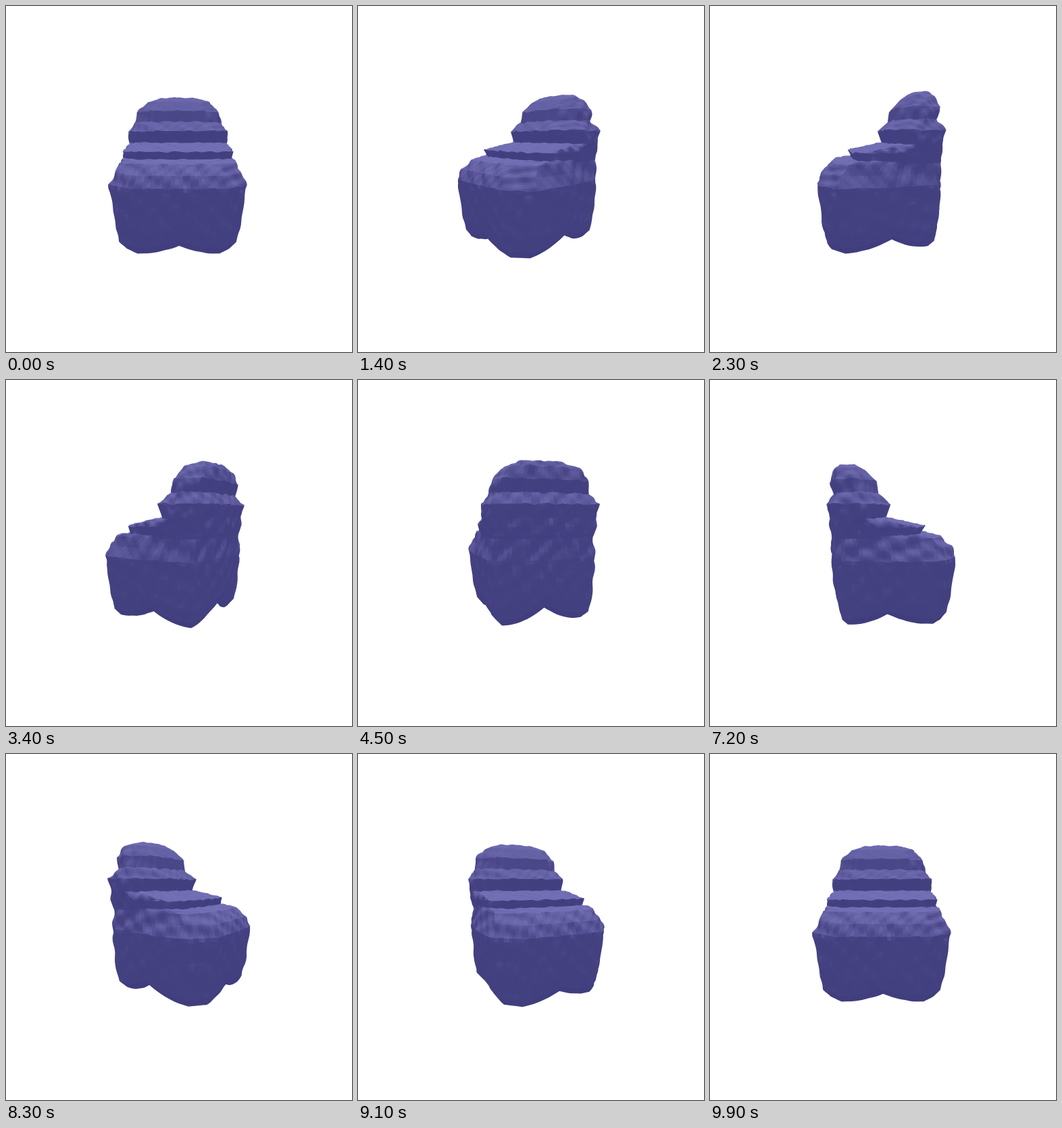
Write an HTML page with a canvas that moves like this. It is 512 by 512 pixels and loops after 10 s.

```html
<!DOCTYPE html>
<html>
<head>
<meta charset="utf-8">
<style>
html, body { margin: 0; width: 100%; height: 100%; overflow: hidden; background: #fff }
canvas { display: block; width: 512px; height: 512px }
</style>
</head>
<body>
<canvas id="stage" width="1024" height="1024"></canvas>
<script>
const ctx = document.getElementById('stage').getContext('2d');
ctx.scale(2, 2);
ctx.lineWidth = 0.8;
ctx.lineJoin = 'round';

// Horizontal outlines, bottom to top:
// height, front z, front corner x, shoulder x z, side x z, back corner x z
const RINGS = [
  [-94, 75, 51, 67, 56, 66, -4, 54, -54],
  [-84, 81, 54, 75, 59, 73, -4, 62, -61],
  [-66, 85, 55, 79, 60, 76, -2, 65, -64],
  [-36, 88, 56, 82, 62, 79, 0, 66, -66],
  [-8, 91, 57, 86, 62, 82, 0, 68, -67],
  [6, 85, 53, 79, 58, 77, -5, 66, -66],
  [19, 72, 50, 75, 50, 74, -10, 64, -66],
  [23, 45, 49, 72, 29, 73, -15, 65, -67],
  [33, 49, 50, 74, 31, 76, -18, 67, -68],
  [44, -1, 44, 70, -22, 76, -35, 67, -68],
  [61, 5, 45, 71, -22, 77, -40, 68, -71],
  [75, -10, 38, 62, -31, 67, -44, 58, -62],
  [91, -12, 35, 59, -32, 64, -46, 55, -67],
  [106, -26, 28, 46, -38, 49, -48, 44, -63],
  [113, -36, 18, 28, -42, 30, -48, 28, -58],
  [114, -46, 1, 2, -48, 2, -49, 1, -50]
];
const LIFT = [11, 0, 0, 16, 0, 22, 0, 16, 0, 0];  // arches between the feet
const AROUND = 12, UP = 6, SIDES = 10 * AROUND;
const DIST = 430, TILT = Math.asin(0.12), SIN = Math.sin(TILT), COS = Math.cos(TILT);
const clamp = v => Math.max(0, Math.min(1, v));
const mix = (a, b, u) => a + (b - a) * u;

function outline([, z0, x1, x2, z2, xs, zs, xb, zb]) {
  const half = [[x1, z0 - 2], [x2, z2], [xs, zs], [xb, zb]];
  const other = half.map(([x, z]) => [-x * 1.03, z]).reverse();
  return [[0, z0], ...half, [0, zb - 8], ...other];
}

function roughen(x, y, z) {
  const amount = y < -14 ? 0.6 : 1;
  const n = amount * (
    1.5 * Math.sin(0.27 * x + 0.8 * Math.sin(0.11 * y)) * Math.sin(0.25 * z + 0.13 * y + 1) +
    0.9 * Math.sin(0.21 * y + 0.17 * x - 0.1 * z) +
    0.6 * Math.sin(0.41 * x - 0.2 * y + 0.37 * z));
  const r = Math.hypot(x, z + 10) + 8;
  return [x + n * x / r, y + 0.5 * n, z + n * (z + 10) / r];
}

function buildRow(ring) {
  const pts = outline(ring), row = [];
  const arch = clamp((-ring[0] - 48) / 46);
  for (let i = 0; i < SIDES; i++) {
    const k = Math.floor(i / AROUND), next = (k + 1) % 10, u = i % AROUND / AROUND;
    const lift = LIFT[k] * (1 - u) ** 2 + LIFT[next] * u * u;
    row.push(roughen(mix(pts[k][0], pts[next][0], u), ring[0] + lift * arch,
      mix(pts[k][1], pts[next][1], u)));
  }
  return row;
}

const rows = [];
for (let j = 0; j <= (RINGS.length - 1) * UP; j++) {
  const k = Math.min(Math.floor(j / UP), RINGS.length - 2), u = j / UP - k;
  rows.push(buildRow(RINGS[k].map((v, i) => mix(v, RINGS[k + 1][i], u))));
}
const verts = rows.flat();

// The light comes from straight above, so each facet keeps its colour while turning
function shade(a, b, c, d) {
  const p = c.map((v, i) => v - a[i]), q = d.map((v, i) => v - b[i]);
  const nx = p[1] * q[2] - p[2] * q[1];
  const ny = p[2] * q[0] - p[0] * q[2];
  const nz = p[0] * q[1] - p[1] * q[0];
  const up = ny / (Math.hypot(nx, ny, nz) || 1);
  const t = up > 0 ? up : up * 0.12;
  return `rgb(${[[69, 48], [66, 47], [130, 52]].map(([v, s]) => Math.round(v + s * t))})`;
}

const facets = [];
for (let j = 0; j < rows.length - 1; j++) {
  for (let i = 0; i < SIDES; i++) {
    const n = (i + 1) % SIDES, low = j * SIDES, high = low + SIDES;
    const ids = [low + i, low + n, high + n, high + i];
    facets.push({ ids, color: shade(...ids.map(id => verts[id])) });
  }
}

function project([x, y, z], cos, sin) {
  const px = x * cos - z * sin, pz = x * sin + z * cos;
  const depth = pz * COS + y * SIN, k = DIST / (DIST - depth);
  return [256 + px * k, 247 - (y * COS - pz * SIN) * k, depth];
}

function draw(angle) {
  const cos = Math.cos(angle), sin = Math.sin(angle);
  const pts = verts.map(v => project(v, cos, sin));
  const seen = [];
  for (const { ids, color } of facets) {
    const [a, b, c, d] = ids.map(id => pts[id]);
    if ((c[0] - a[0]) * (d[1] - b[1]) - (c[1] - a[1]) * (d[0] - b[0]) < 0)
      seen.push({ quad: [a, b, c, d], color, depth: a[2] + b[2] + c[2] + d[2] });
  }
  seen.sort((f, g) => f.depth - g.depth);
  ctx.fillStyle = '#fff';
  ctx.fillRect(0, 0, 512, 512);
  for (const { quad, color } of seen) {
    ctx.fillStyle = ctx.strokeStyle = color;
    ctx.beginPath();
    for (const p of quad) ctx.lineTo(p[0], p[1]);
    ctx.closePath();
    ctx.fill();
    ctx.stroke();
  }
}

let shown = -1;
function tick() {
  const step = Math.floor(performance.now() / 100) % 100;
  if (step !== shown) draw((shown = step) * 2 * Math.PI / 99);
  requestAnimationFrame(tick);
}
tick();
</script>
</body>
</html>
```
